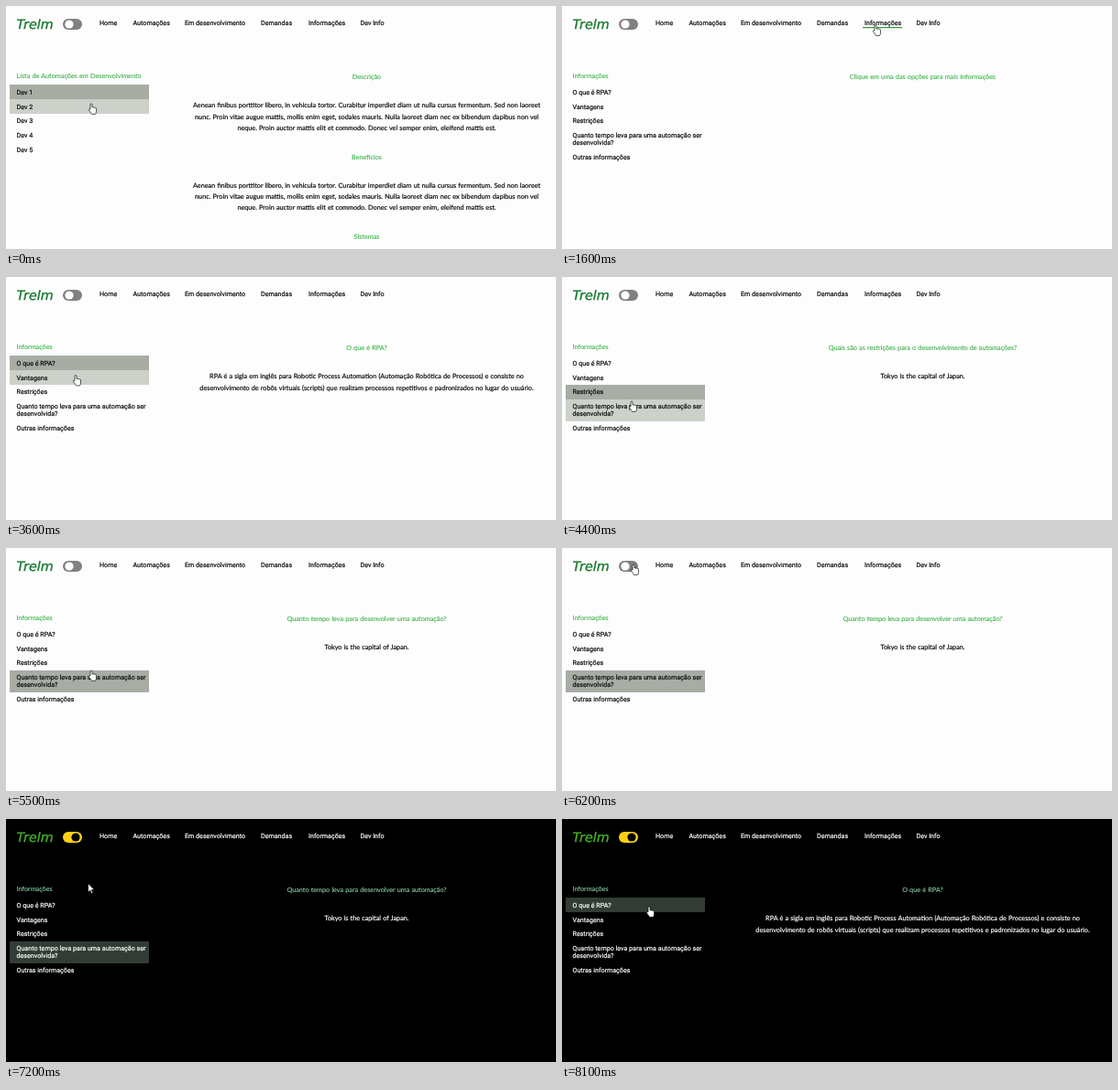
An HTML page that plays this animation: 600 by 266 pixels, repeating every 8.2 s.

```html
<!DOCTYPE html>
<html lang="pt-BR">
<head>
<meta charset="utf-8">
<title>Portal de automações</title>
<style>
  html, body { margin: 0; width: 100%; height: 100%; overflow: hidden; }
  svg {
    display: block; width: 600px; height: 266px; background: var(--bg);
    --bg: #fefdfe; --ink: #0c0c0c; --title: #36b044; --logo: #187a30;
    --selected: #a7ada5; --hover: #ccd1ca;
  }
  svg.dark {
    --bg: #000; --ink: #fff; --title: #90d4ac; --logo: #43ad2b;
    --selected: #323c34; --hover: #20281f;
  }
  text { fill: var(--ink); stroke: var(--ink); stroke-width: .2px; text-rendering: geometricPrecision; white-space: pre; }
  .ui { font: 7.15px Roboto, sans-serif; }
  .copy { font: 7.25px Lato, sans-serif; word-spacing: .3px; }
  .title { fill: var(--title); stroke: var(--title); stroke-width: .1px; }
  .mid { text-anchor: middle; }
  .logo { font: oblique 14.3px "DejaVu Sans", sans-serif; fill: var(--logo); stroke: var(--logo); stroke-width: .4px; }
  rect.selected, rect.hover { shape-rendering: crispEdges; }
  .selected { fill: var(--selected); }
  .hover { fill: var(--hover); }
  .cursor { fill: #fff; stroke: #111; stroke-width: .7; stroke-linejoin: round; }
</style>
</head>
<body>
<svg id="stage" viewBox="0 0 600 266"></svg>
<script>
const LOOP = 8200, STEP = 100, DARK_AT = 6400, NAV_AT = 1400;
const MID = 393.5;
const stage = document.getElementById('stage');

const nav = [
  ['Home', 102, 19], ['Automações', 138.5, 40], ['Em desenvolvimento', 195, 65],
  ['Demandas', 278, 34], ['Informações', 330, 39], ['Dev Info', 386.5, 28]
];

const lorem = [
  'Aenean finibus porttitor libero, in vehicula tortor. Curabitur imperdiet diam ut nulla cursus fermentum. Sed non laoreet',
  'nunc. Proin vitae augue mattis, mollis enim eget, sodales mauris. Nulla laoreet diam nec ex bibendum dapibus non vel',
  'neque. Proin auctor mattis elit et commodo. Donec vel semper enim, eleifend mattis est.'
];

const devPage = {
  title: 'Lista de Automações em Desenvolvimento',
  items: [1, 2, 3, 4, 5].map(n => ['Dev ' + n])
};
const infoPage = {
  title: 'Informações',
  items: [
    ['O que é RPA?'], ['Vantagens'], ['Restrições'],
    ['Quanto tempo leva para uma automação ser', 'desenvolvida?'],
    ['Outras informações']
  ]
};

const devContent = [['Descrição', lorem], ['Benefícios', lorem], ['Sistemas', []]];
const tokyo = ['Tokyo is the capital of Japan.'];
const infoContent = [
  ['O que é RPA?', [
    'RPA é a sigla em inglês para Robotic Process Automation (Automação Robótica de Processos) e consiste no',
    'desenvolvimento de robôs virtuais (scripts) que realizam processos repetitivos e padronizados no lugar do usuário.'
  ]],
  ['Quais são as vantagens de automatizar processos?', ['Paris is the capital of France.']],
  ['Quais são as restrições para o desenvolvimento de automações?', tokyo],
  ['Quanto tempo leva para desenvolver uma automação?', tokyo]
];
const prompt = ['Clique em uma das opções para mais informações', []];

// [time, selected row]
const clicks = [[0, 0], [300, 1], [NAV_AT, -1], [2500, 1], [3300, 0], [4100, 2], [5000, 3], [7700, 0]];

// [time, x, y] of the pointer tip
const path = [
  [0, 93, 107], [900, 94, 107], [1400, 342, 21], [1800, 342, 21], [2400, 79, 109],
  [2700, 78, 108], [3100, 76, 94], [3400, 76, 94], [3800, 76, 121], [4100, 76, 122],
  [4400, 76, 136], [5000, 76, 136], [5500, 93, 134], [5800, 85, 76], [6200, 78, 18],
  [6700, 78, 18], [7500, 95, 95], [8200, 95, 96]
];

const HAND = 'M-1 6V1a1 1 0 0 1 2 0v3q1-.5 1.7.2q1-.4 1.6.3q1.2-.2 1.2.9v3q0 1.5-1 3h-4q-1-2-3-4.2q-.6-1 .3-1.3z';
const ARROW = 'M0 0v9.5l2.2-2 1.5 3.4 1.5-.6-1.5-3.4h3z';

const smooth = p => p * p * (3 - 2 * p);
const text = (cls, x, y, s) => `<text class="${cls}" x="${x}" y="${y}">${s}</text>`;
const rect = (cls, x, y, w, h) => `<rect class="${cls}" x="${x}" y="${y}" width="${w}" height="${h}"/>`;
const mix = (a, b, p) => `color-mix(in srgb, ${b} ${p * 100}%, ${a})`;

function pointerAt(t) {
  const i = path.findIndex(k => k[0] > t);
  const [t0, x0, y0] = path[i - 1], [t1, x1, y1] = path[i];
  const p = smooth((t - t0) / (t1 - t0));
  return [x0 + (x1 - x0) * p, y0 + (y1 - y0) * p];
}

function drawNav(px, py) {
  let hot = false, out = '';
  for (const [label, x, w] of nav) {
    out += text('ui', x, 21.3, label);
    if (py > 13 && py < 25 && px > x - 2 && px < x + w + 2) {
      hot = true;
      out += `<rect x="${x - 2}" y="23" width="${w + 4}" height="1.2" fill="#2f9a35"/>`;
    }
  }
  return [out, hot];
}

function drawList(page, selected, px, py) {
  let y = 86.1, hot = false, out = text('copy title', 11.5, 78.5, page.title);
  page.items.forEach((lines, i) => {
    const h = 15.8 + (lines.length - 1) * 8.2;
    const over = px > 4 && px < 155.5 && py >= y && py < y + h;
    hot ||= over;
    if (i === selected || over) out += rect(i === selected ? 'selected' : 'hover', 4, y, 151.5, h);
    lines.forEach((s, n) => out += text('ui', 11.5, y + 10.6 + n * 8.2, s));
    y += h;
  });
  return [out, hot];
}

function drawContent(sections) {
  return sections.map(([title, lines], i) => {
    const y = 79.8 + i * 87.7;
    return text('copy title mid', MID, y, title) +
      lines.map((s, n) => text('copy mid', MID, y + 31.6 + n * 12.1, s)).join('');
  }).join('');
}

function drawToggle(t) {
  const p = t < DARK_AT ? 0 : smooth(Math.min(1, (t - DARK_AT + 100) / 400));
  return `<rect x="62" y="14" width="21" height="12" rx="6" style="fill:${mix('#808080', '#ffd016', p)}"/>` +
    `<circle cx="${69 + 7 * p}" cy="20" r="4.6" style="fill:${mix('#fff', '#000', p)}"/>`;
}

function draw(t) {
  const [px, py] = pointerAt(t);
  const selected = clicks.findLast(c => c[0] <= t)[1];
  const onDev = t < NAV_AT;
  const sections = onDev ? devContent : [infoContent[selected] || prompt];
  const [menu, navHot] = drawNav(px, py);
  const [list, listHot] = drawList(onDev ? devPage : infoPage, selected, px, py);
  const toggleHot = px > 62 && px < 83 && py > 14 && py < 26;
  const shape = navHot || listHot || toggleHot ? HAND : ARROW;
  stage.classList.toggle('dark', t >= DARK_AT);
  stage.innerHTML = text('logo', 11.5, 24.8, 'Trelm') + drawToggle(t) + menu + list +
    drawContent(sections) +
    `<path class="cursor" d="${shape}" transform="translate(${px} ${py})"/>`;
}

let start, shown = -1;
function tick(now) {
  start ??= now;
  const t = Math.floor((now - start) % LOOP / STEP) * STEP;
  if (t !== shown) draw(shown = t);
  requestAnimationFrame(tick);
}
draw(0);
requestAnimationFrame(tick);
</script>
</body>
</html>
```
